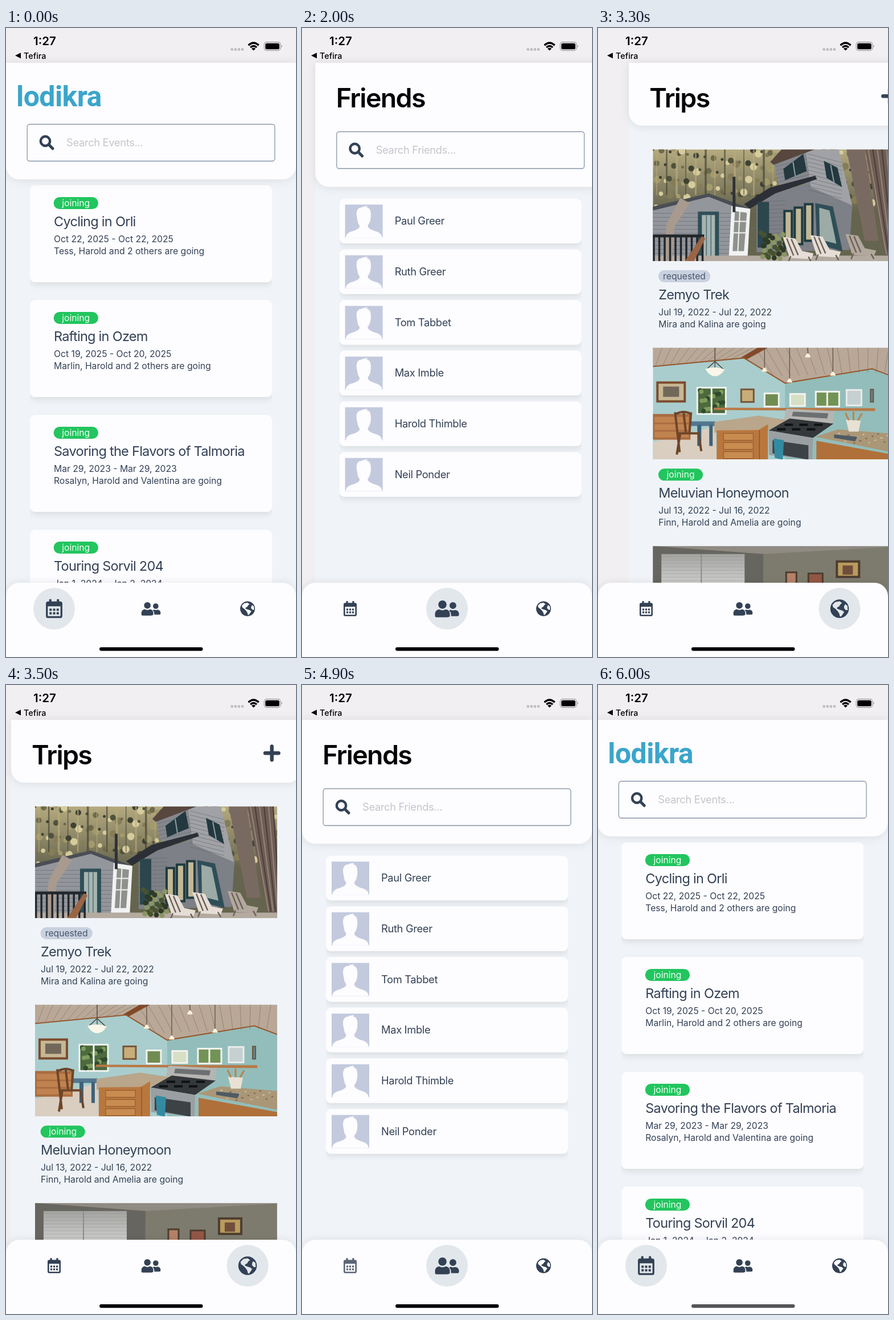
Write an HTML page that moves like this. It is 509 px wide and 1101 px high and loops after 6.1 s.

```html
<!DOCTYPE html>
<html lang="en">
<head>
<meta charset="utf-8">
<title>Trip planner</title>
<style>
  html, body { margin: 0; width: 100%; height: 100%; overflow: hidden; background: #f1eff2; }
  svg { display: block; width: 100%; height: 100%; }
  text { font-family: Inter, "Open Sans", sans-serif; fill: #334155; white-space: pre; }
  .heading { font-size: 46.5px; font-weight: 600; letter-spacing: -1.65px; fill: #050507; }
  .brand { font: 700 50px Roboto, sans-serif; letter-spacing: -.6px; fill: #3ba5cb; }
  .title { font-size: 23.5px; letter-spacing: -.72px; }
  .small { font-size: 15.7px; }
  .name { font-size: 18.3px; letter-spacing: -.32px; }
  .hint { font-size: 18.3px; letter-spacing: -.32px; fill: #c4c6cb; }
  .pill { font-size: 15.7px; text-anchor: middle; }
  .clock { font-size: 20.5px; font-weight: 600; fill: #000; }
  .back { font-size: 14.4px; font-weight: 500; fill: #000; }
</style>
</head>
<body>
<svg id="stage" viewBox="0 0 509 1101"></svg>
<script>
const W = 509, LOOP = 6100, SLIDE = 932;
const WHITE = '#fdfcff', INK = '#334155';

const rect = (x, y, w, h, fill, extra = '') =>
  `<rect x="${x}" y="${y}" width="${w}" height="${h}" fill="${fill}" ${extra}/>`;
const path = (d, fill, extra = '') => `<path d="${d}" fill="${fill}" ${extra}/>`;
const poly = (points, fill) => `<polygon points="${points}" fill="${fill}"/>`;
const line = (d, color, width, extra = '') =>
  path(d, 'none', `stroke="${color}" stroke-width="${width}" ${extra}`);
const circle = (x, y, r, fill) => `<circle cx="${x}" cy="${y}" r="${r}" fill="${fill}"/>`;
const text = (x, y, style, words) => `<text x="${x}" y="${y}" class="${style}">${words}</text>`;
const repeat = (n, draw) => Array.from({ length: n }, (_, i) => draw(i)).join('');

// Shared parts of the pages
const header = bottom => path(
  `M0 61H${W}V${bottom - 24}a24 24 0 0 1-24 24H24a24 24 0 0 1-24-24Z`, WHITE, 'filter="url(#soft)"');

const search = (y, hint) =>
  rect(37.2, y + .5, 434.6, 64.5, 'none', 'rx="4.5" stroke="#8798a8" stroke-width="1.3"') +
  `<circle cx="69" cy="${y + 30}" r="8.2" fill="none" stroke="${INK}" stroke-width="4.4"/>` +
  line(`M75.5 ${y + 36.5}l6.5 6.5`, INK, 5, 'stroke-linecap="round"') +
  text(106, y + 39, 'hint', hint);

const card = (y, h) => rect(42, y, 425, h, WHITE, 'rx="9" filter="url(#drop)"');

const details = (x, y, status, title, dates, going) => {
  const joining = status === 'joining', w = joining ? 78.3 : 91.3;
  return rect(x - .4, y, w, 21, joining ? '#22c55e' : '#c9d1df', 'rx="10.5"') +
    `<text x="${x - .4 + w / 2}" y="${y + 16}" class="pill" style="fill:${joining ? '#f3fff6' : '#475569'}">${status}</text>` +
    text(x, y + 51, 'title', title) + text(x, y + 79, 'small', dates) + text(x, y + 100, 'small', going);
};

// Pages
const events = [
  ['Cycling in Orli', 'Oct 22, 2025 - Oct 22, 2025', 'Tess, Harold and 2 others are going'],
  ['Rafting in Ozem', 'Oct 19, 2025 - Oct 20, 2025', 'Marlin, Harold and 2 others are going'],
  ['Savoring the Flavors of Talmoria', 'Mar 29, 2023 - Mar 29, 2023', 'Rosalyn, Harold and Valentina are going'],
  ['Touring Sorvil 204', 'Jan 1, 2024 - Jan 2, 2024', '']
];
const friends = ['Paul Greer', 'Ruth Greer', 'Tom Tabbet', 'Max Imble', 'Harold Thimble', 'Neil Ponder'];

const eventsPage = () =>
  `<g clip-path="url(#list)">` +
  events.map((event, i) => card(275 + 201 * i, 170) + details(84, 296 + 201 * i, 'joining', ...event)).join('') +
  '</g>' + header(265) + text(18, 137, 'brand', 'lodikra') + search(168, 'Search Events...');

const avatar = (x, y) => `<g transform="translate(${x} ${y})">` + rect(0, 0, 66, 58, '#c3cade') +
  path('M1 58C2 50 8 48 15 46C22 43 27 41 25 36C22 33 22 28 21 24C18 11 22 5 30 5C33 2 37 4 39 2L38 5C45 6 46 14 45 24C44 29 43 33 40 36C39 41 44 43 51 46C58 48 64 50 65 58Z', WHITE) + '</g>';

const friendsPage = () =>
  `<g clip-path="url(#list)">` +
  friends.map((name, i) => {
    const y = 298.7 + 88.7 * i;
    return card(y, 78.3) + avatar(52, y + 10.4) + text(139, y + 45.5, 'name', name);
  }).join('') +
  '</g>' + header(278) + text(36, 139, 'heading', 'Friends') + search(181, 'Search Friends...');

// Photo stand-ins, drawn in a 425 x 196 box
const leafColors = ['#4f523c', '#a39a6c', '#6d6b4c', '#d6cb9c', '#3d4233', '#857d57'];
const foliage = () => repeat(170, i =>
  circle(i * 61.8 % 425, i * 37.3 % 104, 2.5 + i % 4 * 1.3, leafColors[i * 7 % 6]));
const shingles = (x, y, w, rows, slope) => repeat(rows, i =>
  line(`M${x} ${y + i * 7}l${w} ${slope}`, '#5d6168', 1, 'opacity=".55"'));

const cabin = () =>
  rect(0, 0, 425, 196, 'url(#forest)') + foliage() +
  repeat(13, i => rect(6 + i * 17, 0, 1.5 + i % 3, 80, i % 2 ? '#494736' : '#b9ac7c', 'opacity=".7"')) +
  poly('340,0 372,0 396,160 372,160', '#796a61') + poly('372,0 418,0 425,60 425,190 408,184', '#6e5d54') +
  repeat(6, i => line(`M${378 + i * 8} 0L${410 + i * 4} 184`, i % 2 ? '#4a3e39' : '#95857a', 2)) +
  poly('0,105 98,80 165,104 165,196 0,196', '#93969b') + shingles(0, 112, 165, 11, 0) +
  poly('0,100 98,77 166,102 163,108 98,83 0,107', '#4a4e54') +
  poly('182,85 277,58 350,98 345,176 182,180', '#7d8086') + shingles(182, 92, 50, 12, -2) +
  poly('212,22 270,0 282,58 222,66', '#85888d') + shingles(215, 30, 62, 5, -14) +
  poly('268,0 326,0 350,98 277,66', '#a0a2a6') + shingles(272, 8, 60, 10, 15) +
  poly('206,22 226,0 284,0 212,27', '#57473f') +
  poly('160,96 205,67 285,46 288,52 215,77 170,104', '#2c3036') +
  poly('229,34 264,8 270,38 232,54', '#23393f') + poly('300,20 324,32 332,66 305,50', '#23393f') +
  line('M246 22l4 25M312 27l6 31', '#8fa0a0', 2) +
  repeat(3, i => rect(231 + i * 18, 108 - i * 6, 13, 64, '#c2b896', 'stroke="#1f3b42" stroke-width="4"')) +
  poly('285,94 316,100 333,178 288,166', '#2f4e58') + poly('292,102 310,107 322,165 293,158', '#9caba5') +
  rect(79, 109, 37, 83, '#2f4f58') + rect(86, 115, 23, 72, '#a7b5b0') +
  line('M94 115V187M102 115V187', '#4d6a70', 1.5) +
  poly('138,99 171,104 166,194 133,194', '#f1f2f2') + poly('144,108 165,111 160,178 140,178', '#8f918d') +
  line('M153 102L149 180M142 126H164M141 146H163', '#f1f2f2', 2) +
  rect(184, 92, 20, 80, '#2c464e') + rect(140, 48, 5, 62, '#2f3235') +
  rect(0, 186, 425, 10, '#b5aaa0') +
  poly('48,85 65,94 38,135 33,196 18,196 24,130', '#a89a8e') +
  rect(0, 149, 90, 5, '#22272c') + repeat(10, i => rect(i * 9.5, 152, 3.5, 44, '#22272c')) +
  poly('56,196 86,152 92,156 72,196', '#9a6545') +
  repeat(30, i => circle(190 + i * 17 % 43, 146 + i * 13 % 46, 4.5, ['#46532f', '#8b9664', '#2f3a25'][i % 3])) +
  [[228, 153], [276, 150], [338, 148]].map(([x, y], i) =>
    poly(`${x},${y} ${x + 22},${y + 3} ${x + 34},${y + 25} ${x + 54},${y + 29} ${x + 50},${y + 39} ${x + 12},${y + 37}`,
      i < 2 ? '#e6ded6' : '#b3a89d') +
    line(`M${x + 7} ${y + 3}l12 30M${x + 15} ${y + 4}l12 28M${x + 14} ${y + 34}l-4 10M${x + 45} ${y + 35}l5 9`, '#6c6259', 2.5)).join('');

const framed = (x, y, w, h, fill, border, width = 3) =>
  rect(x, y, w, h, fill, `stroke="${border}" stroke-width="${width}"`);

const lamp = (x, y) => line(`M${x} 0V${y}`, '#574b41', 1.2) +
  path(`M${x - 5} ${y + 7}q5-14 10 0Z`, '#fff3dc');

const kitchen = () =>
  rect(0, 0, 425, 196, '#a9cdcd') + poly('232,62 385,37 425,52 425,196 232,196', '#93bdba') +
  poly('0,0 425,0 425,52 385,37 232,62 160,17 0,33', '#b9a897') +
  repeat(12, i => line(`M${i * 16} 0L${i * 13 - 8} ${32 - i}`, '#998674', 1)) +
  repeat(14, i => line(`M${180 + i * 18} 0L${212 + i * 15} ${50 - i * .6}`, '#98836f', 1)) +
  poly('155,17 184,0 202,0 164,21', '#82492a') +
  line('M0 33L160 18L232 62L385 37L425 52', '#96582f', 2) +
  framed(8, 61, 48, 33, '#c7b794', '#7c4c2e', 4) + rect(18, 68, 28, 18, '#71685a') +
  framed(78, 70, 50, 46, '#4c6a3d', '#eef3f0') +
  repeat(18, i => circle(83 + i * 17 % 41, 75 + i * 11 % 37, 4, i % 2 ? '#7f9c5c' : '#2f4a2c')) +
  line('M103 70V116', '#eef3f0', 3) +
  framed(155, 73, 22, 22, '#c8ad79', '#77573b') +
  framed(196, 80, 25, 23, '#708c53', '#f2f3ee') + framed(241, 81, 26, 21, '#d7dfc5', '#f2f3ee') +
  framed(286, 77, 41, 26, '#729356', '#f2f3ee') + line('M306 77V103', '#f2f3ee', 3) +
  framed(340, 74, 26, 27, '#c6d0d0', '#e9ecea') + framed(382, 73, 5, 22, '#65848a', '#685442', 2) +
  poly('0,165 110,138 112,196 0,196', '#d9cec0') +
  rect(0, 116, 66, 45, '#a96d40') + repeat(3, i => rect(3, 121 + i * 13, 60, 10, '#c08350')) +
  rect(64, 129, 46, 8, '#52768e') + rect(78, 135, 7, 37, '#3f6179') + rect(99, 135, 6, 37, '#3f6179') +
  line('M39 113L47 183M67 113L64 152M41 116Q54 109 67 116M43 150H82M80 150L85 181M48 150L42 187M54 114L58 149', '#6f4528', 4) +
  poly('107,105 390,106 390,111 107,109', '#b87946') +
  poly('108,130 185,119 238,127 201,145 108,149', '#b9a68b') +
  poly('112,145 186,144 202,134 202,196 112,196', '#b9773e') +
  repeat(3, i => framed(124, 150 + i * 16, 52, 12, '#c88c50', '#8d572c', 1)) +
  line('M187 144V196', '#8d572c', 1.5) +
  poly('234,107 319,111 316,133 230,126', '#b5b5b2') + poly('246,112 308,115 306,124 244,120', '#6d7072') +
  poly('203,145 240,124 317,133 281,158', '#34383b') +
  repeat(6, i => line(`M${218 + i * 13} ${143 - i % 2 * 8}h15`, '#0e1113', 4)) +
  poly('203,145 281,158 280,196 204,188', '#9a9fa2') + poly('210,162 273,171 273,196 210,185', '#3b4347') +
  poly('212,159 230,162 228,196 214,193', '#338ba1') +
  poly('285,156 325,143 425,151 425,184', '#aa9777') +
  repeat(40, i => circle(326 + i * 37 % 95, 150 + i * 13 % 18, 1.2, i % 2 ? '#7d6b52' : '#cdbd9f')) +
  poly('287,163 425,188 425,196 287,196', '#b0703a') +
  poly('339,126 365,128 361,147 344,147', '#e8e1d4') + line('M344 127L338 114M352 127V112M360 127L367 115', '#b7854e', 3) +
  poly('318,152 359,156 355,164 318,158', '#4e5b64') +
  line('M109 0V35M94 38L109 24L124 38', '#514e49', 1.5) + path('M92 37Q109 32 126 38Q119 50 109 50Q99 50 92 37Z', '#faf6e9') +
  lamp(196, 35) + lamp(272, 10) + lamp(316, 42) + lamp(240, 54);

const lounge = () =>
  rect(0, 0, 425, 196, '#7d7b6d') + poly('0,0 425,0 425,1 194,14 0,0', '#8f8a82') +
  poly('0,0 194,14 192,196 0,196', '#67655f') + rect(15, 14, 146, 180, 'url(#blind)') +
  repeat(11, i => rect(15, 18 + i * 6, 146, 1, '#888b8a', 'opacity=".35"')) + rect(84, 14, 2, 120, '#8b8e8b') +
  framed(323, 27, 39, 27, '#b89b5d', '#4d3d30', 4) + rect(333, 34, 18, 16, '#704d3c') +
  framed(234, 46, 18, 26, '#b58268', '#4d3d30') + framed(273, 48, 25, 25, '#935744', '#4d3d30');

const trip = (y, photo, ...info) =>
  `<svg x="42" y="${y}" width="425" height="195.5">${photo()}</svg>` + (info.length ? details(52, y + 211.7, ...info) : '');

const tripsPage = () =>
  trip(212.4, cabin, 'requested', 'Zemyo Trek', 'Jul 19, 2022 - Jul 22, 2022', 'Mira and Kalina are going') +
  trip(559.6, kitchen, 'joining', 'Meluvian Honeymoon', 'Jul 13, 2022 - Jul 16, 2022', 'Finn, Harold and Amelia are going') +
  trip(906.8, lounge) +
  header(171) + text(36, 139, 'heading', 'Trips') +
  line('M446 119.3h23.5M457.7 107.5v23.5', INK, 6.4, 'stroke-linecap="round"');

// Tab icons, centred on 0,0
const calendar =
  rect(-10.2, -8.9, 20.4, 20.6, 'none', `rx="1.8" stroke="${INK}" stroke-width="2.6"`) +
  rect(-11, -9.5, 22, 6, INK, 'rx="1.5"') +
  rect(-7, -13.5, 3.2, 6, INK, 'rx="1"') + rect(3.8, -13.5, 3.2, 6, INK, 'rx="1"') +
  repeat(6, i => rect(-6.6 + i % 3 * 5, -.2 + (i > 2) * 5, 3.2, 3.2, INK, 'rx=".5"'));
const people =
  circle(-6.4, -5.8, 5.8, INK) +
  path('M-16.8 10V7.6C-16.8 3-13.5 1-10.5 1Q-6.4 3.4-2.3 1C1 1 4 3 4 7.6V10Q4 12-2 12H-14.8Q-16.8 12-16.8 10Z', INK) +
  circle(8.3, -4.5, 4.8, INK) +
  path('M3 2.8Q4.5 1.4 6 1.7Q8.5 3 11 1.7C14.5 1.7 16.8 4 16.8 7V8.5Q16.8 10.3 15 10.3H5.8Q6 5 3 2.8Z', INK);
const globe = path(
  'M-13 0A13 13 0 1 1 13 0A13 13 0 1 1-13 0Z' +
  'M-10-5.5L-6-9.5L0-10.5L3.5-8L1-6L-.5-3.5L-3-2L-4-.5L-1 1L4 2.5L6.5 4.5L4.5 7.5L2 11L.5 10.5L-.5 6.5L-3 3L-6 0L-9-2Z' +
  'M8-6.5L11-4L11.5 2L8.5 1.8L6.2-1L6.5-4Z', INK, 'fill-rule="evenodd"');

const pages = [eventsPage, friendsPage, tripsPage];
const tabs = [[84.5, calendar], [254.5, people], [424, globe]];

const statusBar =
  text(48, 30, 'clock', '1:27') + path('M16 48.3L26 43.3V53.3Z', '#000') + text(31, 53.5, 'back', 'Tefira') +
  repeat(4, i => rect(394.5 + i * 6.1, 35.3, 4.4, 4.4, '#bfbdc0', 'rx="1.4"')) +
  line('M425.4 30.2Q434.5 21.8 443.6 30.2M429 34Q434.5 29 440 34', '#000', 3.2) +
  path('M434.5 39.6L431 36.2Q434.5 33.4 438 36.2Z', '#000') +
  rect(453.2, 24.7, 28.6, 14.6, 'none', 'rx="4.2" stroke="#9b999d" stroke-width="1.2"') +
  rect(455.2, 26.7, 24.6, 10.6, '#000', 'rx="2.6"') + path('M483.3 29.6q3 2.4 0 4.8Z', '#9b999d');

const stage = document.getElementById('stage');
stage.innerHTML = `
  <defs>
    <filter id="soft" x="-10%" y="-40%" width="120%" height="180%">
      <feDropShadow dx="0" dy="1" stdDeviation="8" flood-color="#000" flood-opacity=".1"/></filter>
    <filter id="drop" x="-10%" y="-40%" width="120%" height="180%">
      <feDropShadow dx="0" dy="5" stdDeviation="5" flood-color="#000" flood-opacity=".085"/></filter>
    <clipPath id="list"><rect x="42" y="262" width="425" height="839"/></clipPath>
    <linearGradient id="forest" x2="0" y2="1"><stop stop-color="#b5aa7f"/><stop offset=".55" stop-color="#65644e"/></linearGradient>
    <linearGradient id="blind" x2="0" y2="1"><stop stop-color="#a3a4a0"/><stop offset=".3" stop-color="#d0d1cf"/></linearGradient>
  </defs>` +
  rect(0, 0, W, 1101, '#f1eff2') +
  pages.map(page => `<g class="page">${rect(0, 61, W, 1040, '#f0f4f8')}${page()}</g>`).join('') +
  statusBar +
  rect(0, 971, W, 200, WHITE, 'rx="24" filter="url(#soft)"') +
  tabs.map(([, icon]) => `<g class="tab">${circle(0, 0, 29.2, '#e2e7ec')}${icon}</g>`).join('') +
  rect(164, 1084, 181.5, 6.2, '#000', 'id="home" rx="3.1"');

const pageNodes = stage.querySelectorAll('.page');
const tabNodes = stage.querySelectorAll('.tab');
const home = document.getElementById('home');

// Each visit: tab pressed, page swapped, new page slides in from one side
const visits = [
  { page: 0, press: -3000, swap: -3000, slide: -3000, side: -1 },
  { page: 1, press: 1180, swap: 1290, slide: 1404, side: 1 },
  { page: 2, press: 2480, swap: 2660, slide: 2811, side: 1 },
  { page: 1, press: 3680, swap: 3840, slide: 3990, side: -1 },
  { page: 0, press: 4880, swap: 5040, slide: 5176, side: -1 }
];
const clamp = v => Math.min(1, Math.max(0, v));

function pressOpacity(tab, t) {
  const pressed = visits.filter(v => v.page === tab && v.press <= t).pop();
  if (!pressed) return 1;
  return t < pressed.swap
    ? 1 - .2 * clamp((t - pressed.press) / 20)
    : .8 + .2 * clamp((t - pressed.swap - 60) / 200);
}

function draw(t) {
  const index = visits.filter(v => v.swap <= t).length - 1;
  const visit = visits[index], previous = visits[index - 1];
  const x = visit.side * W * (1 - clamp((t - visit.slide) / SLIDE)) ** 3;
  const grown = 1 - (1 - clamp((t - visit.swap) / 400)) ** 2;

  pageNodes.forEach((node, i) => {
    node.setAttribute('display', i === visit.page ? 'inline' : 'none');
    node.setAttribute('transform', `translate(${x} 0)`);
    node.setAttribute('opacity', clamp((t - visit.slide) / 300));
  });
  tabNodes.forEach((node, i) => {
    const active = i === visit.page;
    const size = active ? grown : previous && i === previous.page ? 1 - grown : 0;
    node.setAttribute('transform', `translate(${tabs[i][0]} 1016.5) scale(${1 + .25 * size})`);
    node.setAttribute('opacity', pressOpacity(i, t));
    node.firstChild.setAttribute('visibility', active ? 'visible' : 'hidden');
  });
  const gray = 85 * clamp((t - 5600) / 400);
  home.setAttribute('fill', `rgb(${gray},${gray},${gray})`);
}

const start = performance.now();
function tick() {
  draw((performance.now() - start) % LOOP);
  requestAnimationFrame(tick);
}
tick();
</script>
</body>
</html>
```
